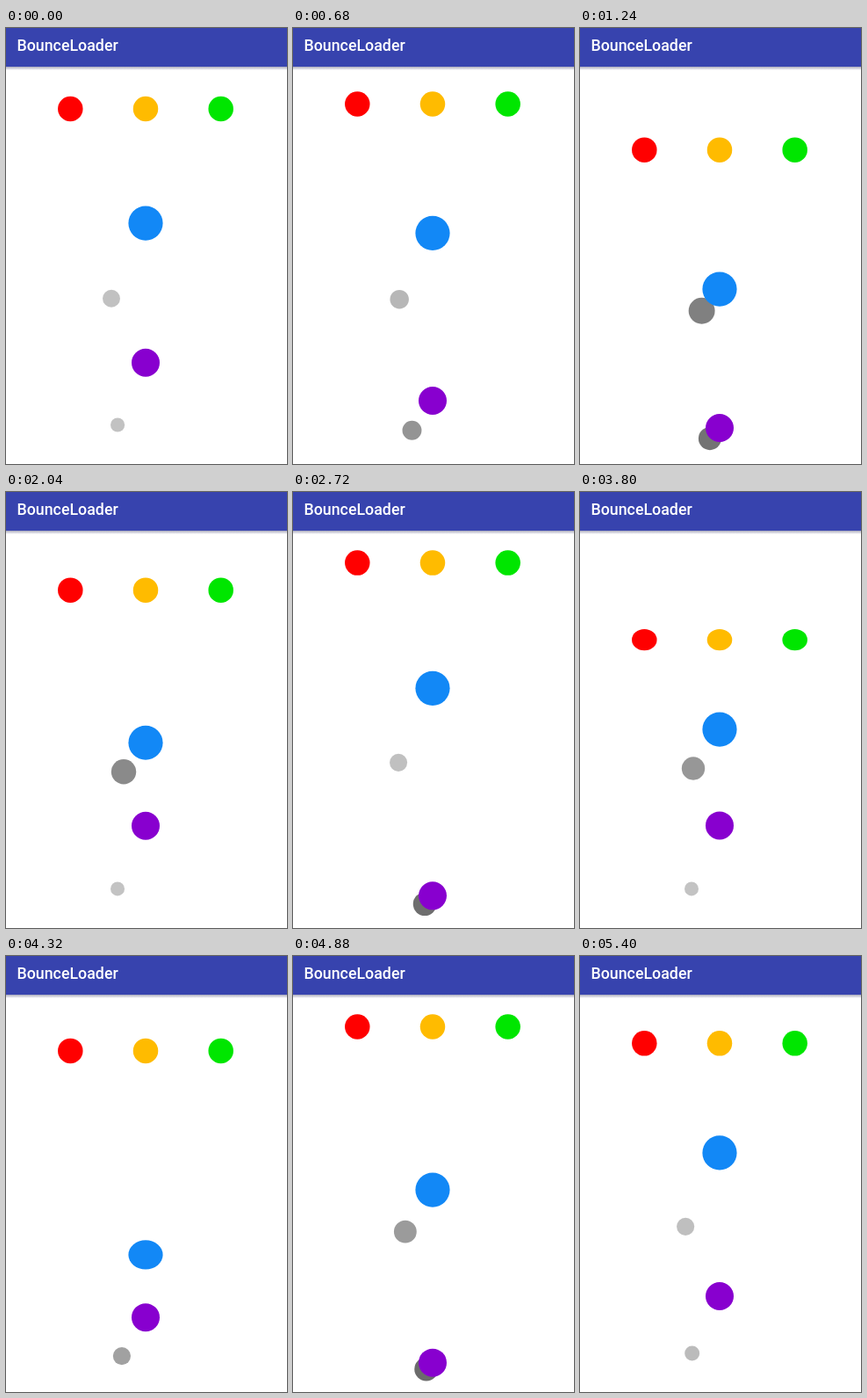
An HTML page with a canvas that plays this animation: 320 by 496 pixels, repeating every 5440 ms.

```html
<!DOCTYPE html>
<html lang="en">
<head>
<meta charset="utf-8">
<title>BounceLoader</title>
<style>
  html, body { margin: 0; width: 100%; height: 100%; overflow: hidden; background: #fff; }
  canvas { position: absolute; left: 0; top: 0; }
  header {
    position: absolute; left: 0; top: 0; width: 320px; height: 44px; box-sizing: border-box;
    padding-left: 12.5px; background: #3743ae; color: #fff;
    font: 500 17.8px/40px Roboto, sans-serif;
  }
  header::after {
    content: ""; position: absolute; left: 0; top: 44px; width: 100%; height: 4px;
    background: linear-gradient(#aaaabc, #fff);
  }
</style>
</head>
<body>
<canvas width="320" height="496"></canvas>
<header>BounceLoader</header>
<script>
const LOOP = 5440, STEP = 40, PAUSE = 28, SQUEEZE = 50;
const ctx = document.querySelector('canvas').getContext('2d');

// tops: times of arrival at the top; drops: times of the next fall
const row = { y: 80.5, r: 14.25, fall: 1000, tops: [366, 2644, 4886, 7160], drops: [415, 2687, 4931] };
const loaders = [
  { ...row, x: 73.3, color: '#ff0000' },
  { ...row, x: 159, color: '#ffbb00' },
  { ...row, x: 244.7, color: '#00e600' },
  { x: 159, y: 219.4, r: 19.6, fall: 1200, color: '#1288f6', shadow: true,
    tops: [180, 2938, 5636], drops: [265, 3012] },
  { x: 159, y: 379.4, r: 16, fall: 800, color: '#8800cf', shadow: true,
    tops: [95, 1950, 3815, 5625], drops: [135, 1990, 3860] },
];

const clamp = v => Math.max(0, Math.min(1, v));

function ellipse(x, y, rx, ry, color) {
  ctx.fillStyle = color;
  ctx.beginPath();
  ctx.ellipse(x, y, rx, ry, 0, 0, 2 * Math.PI);
  ctx.fill();
}

function drawLoader({ x, y, r, fall, color, shadow, tops, drops }, t) {
  const n = drops.filter(d => d <= t).length;
  const since = n ? t - drops[n - 1] : 1e5;
  const until = Math.max(0, tops[n] - t);
  const p = clamp((Math.min(since, until) / fall) ** 2);
  const rest = Math.min(since, until) - fall;
  const squash = 1 - 0.15 * clamp((rest - PAUSE) / SQUEEZE);
  const floor = y + 7 * r;

  if (shadow && p < 1) {
    const s = 0.5 + 0.4 * p, off = s * (1 - p) * r;
    ellipse(x - 4 * off, floor - r - 3 * off, s * r, s * r, `rgba(0,0,0,${0.235 + 0.4 * p})`);
  }
  const cy = p < 1 ? y + 6 * r * p : floor - r * squash;
  ellipse(x, cy, r, r * squash, color);
}

function frame() {
  const t = Math.floor(performance.now() % LOOP / STEP) * STEP;
  ctx.clearRect(0, 0, 320, 496);
  loaders.forEach(l => drawLoader(l, t));
  requestAnimationFrame(frame);
}
frame();
</script>
</body>
</html>
```
